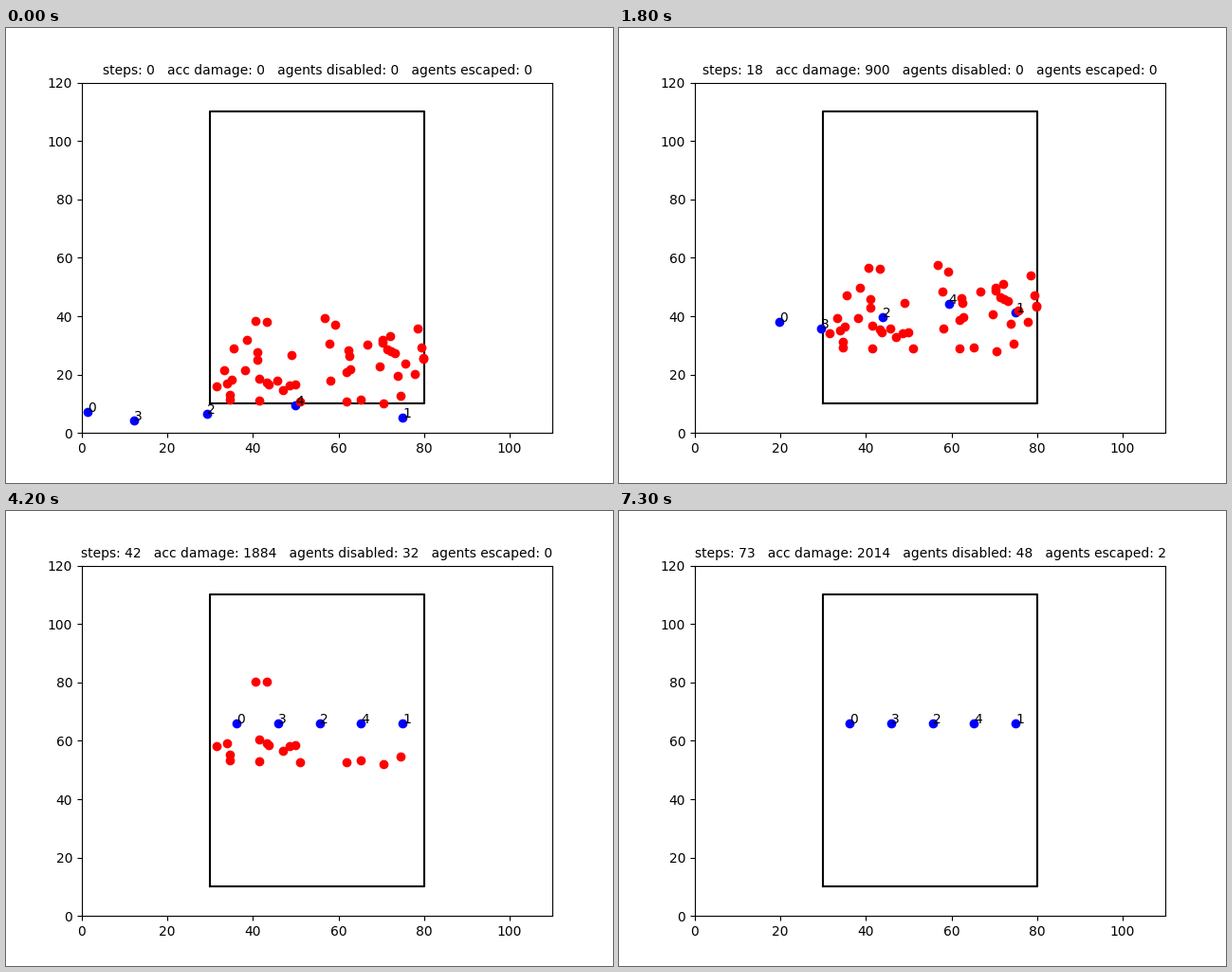
Write a matplotlib script that moves like this. It is 640 px wide and 480 px high and loops after 7400 ms.

```python
import numpy as np
import matplotlib.pyplot as plt
from matplotlib.animation import FuncAnimation

STEPS = 74
LEFT, RIGHT, BOTTOM, TOP = 30, 80, 10, 110
SPEED = 2.0    # robot travel per step
REACH = 6.9    # distance at which a parked robot disables an agent

# Agent start positions (x, y); every agent climbs one unit per step.
AGENTS = np.array([
    (31.4, 16.1), (33.3, 21.5), (33.9, 17.0), (35.0, 18.3), (34.6, 13.1),
    (34.6, 11.4), (35.5, 29.0), (38.1, 21.5), (38.6, 31.9), (40.6, 38.4),
    (43.2, 38.1), (41.0, 27.7), (41.0, 25.0), (41.5, 18.6), (41.5, 11.1),
    (43.2, 17.3), (43.7, 16.6), (45.7, 17.9), (47.0, 14.7), (48.6, 16.3),
    (49.9, 16.6), (49.0, 26.7), (51.0, 10.8), (56.8, 39.4), (59.2, 37.1),
    (57.9, 30.6), (58.1, 17.9), (62.3, 28.3), (62.5, 26.4), (61.9, 20.8),
    (62.8, 21.8), (61.9, 10.8), (65.2, 11.4), (66.8, 30.3), (69.6, 22.8),
    (70.3, 31.9), (70.3, 30.9), (72.1, 33.2), (71.4, 28.6), (72.3, 28.0),
    (73.2, 27.3), (70.5, 10.1), (74.5, 12.7), (73.9, 19.5), (75.6, 23.8),
    (77.8, 20.2), (78.5, 35.8), (79.4, 29.3), (79.8, 25.7), (79.8, 25.3),
])

STARTS = np.array([(1.4, 7.2), (75.0, 5.3), (29.3, 6.6), (12.2, 4.3), (49.9, 9.5)])
SLOTS = np.linspace(36.15, 75, 5)[[0, 4, 2, 1, 3]]
GOALS = np.column_stack([SLOTS, np.full(5, 66.0)])
DIST = np.hypot(*(GOALS - STARTS).T)


def robots_at(step):
    part = np.minimum(step * SPEED / DIST, 1)
    return STARTS + (GOALS - STARTS) * part[:, None]


def simulate():
    pos = AGENTS.copy()
    alive = np.ones(len(pos), bool)
    damage = disabled = escaped = 0
    log = [(pos.copy(), damage, disabled, escaped)]
    for step in range(1, STEPS):
        # Only one agent leaves per step; others at the exit wait.
        leaving = np.flatnonzero(alive & (pos[:, 1] + 1 > TOP))
        moving = alive.copy()
        moving[leaving[1:]] = False
        pos[moving, 1] += 1
        damage += moving.sum()
        alive[leaving[:1]] = False
        escaped += len(leaving[:1])

        parked = GOALS[step * SPEED >= DIST]
        gap = np.linalg.norm(pos[:, None] - parked[None], axis=2)
        hit = alive & (gap < REACH).any(axis=1)
        alive &= ~hit
        disabled += hit.sum()
        log.append((pos[alive], damage, disabled, escaped))
    return log


LOG = simulate()

fig, ax = plt.subplots(figsize=(6.4, 4.8), dpi=100)
ax.set_xlim(0, 110)
ax.set_ylim(0, 120)
ax.plot([LEFT, RIGHT, RIGHT, LEFT, LEFT], [BOTTOM, BOTTOM, TOP, TOP, BOTTOM], "k")
robots, = ax.plot([], [], "bo")
agents, = ax.plot([], [], "ro")
labels = [ax.text(0, 0, str(i)) for i in range(len(STARTS))]
title = ax.set_title("", fontsize=10)


def draw(step):
    pos, damage, disabled, escaped = LOG[step]
    spots = robots_at(step)
    robots.set_data(*spots.T)
    agents.set_data(*pos.T)
    for label, spot in zip(labels, spots):
        label.set_position(spot)
    title.set_text(f"steps: {step}   acc damage: {damage}   "
                   f"agents disabled: {disabled}   agents escaped: {escaped}")
    return [robots, agents, title, *labels]


anim = FuncAnimation(fig, draw, frames=STEPS, interval=100,
                     init_func=lambda: draw(0), repeat=True)
plt.show()
```
